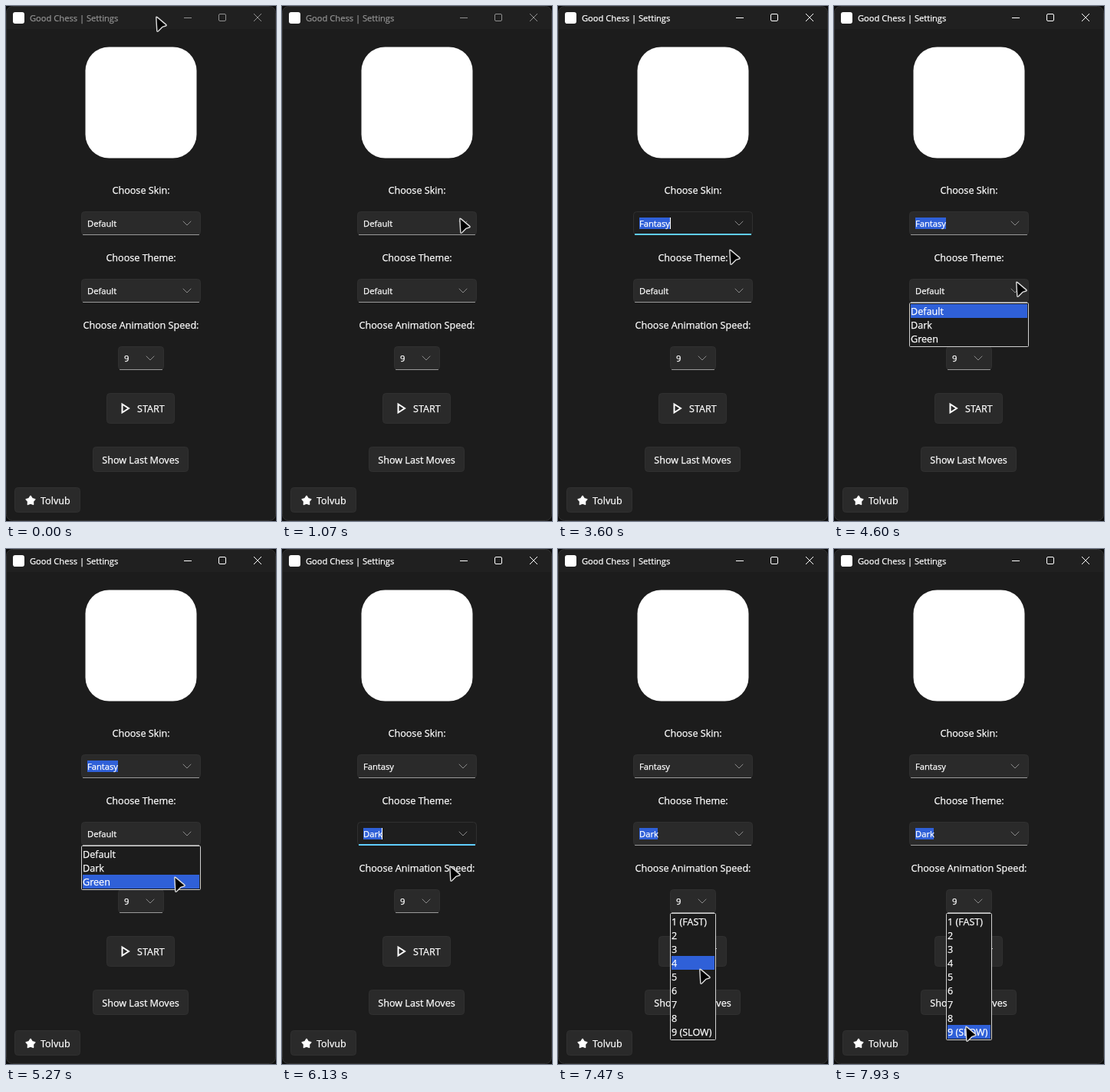
An HTML page for the animation above (8 s loop, 352 by 672 pixels).

```html
<!DOCTYPE html>
<html lang="en">
<head>
<meta charset="utf-8">
<title>Settings</title>
<style>
  html, body { margin: 0; width: 100%; height: 100%; overflow: hidden; background: #0c0c0c; }
  svg { display: block; width: 100%; height: 100%; }
  text { font: 12.6px "Open Sans", "Noto Sans", sans-serif; fill: #fff; stroke: #fff; stroke-width: .25px; white-space: pre; }
  .small { font-size: 11.2px; }
  .title { font-size: 11.15px; }
  .mid { text-anchor: middle; }
  .line { fill: none; stroke: #fff; }
  .button, .field { fill: #2a2a2a; stroke: #303030; }
  .rule { fill: #9a9a9a; }
  .chevron { fill: none; stroke: #8c8c8c; stroke-linecap: round; stroke-linejoin: round; }
  .mark { fill: #2f60d8; }
  .list { fill: #1c1c1c; stroke: #d0d0d0; }
  .focus .field { fill: #1e1e1e; }
  .focus .rule { fill: #60cdff; }
</style>
</head>
<body>
<svg viewBox="0 0 352 672">
  <rect x=".5" y=".5" width="351" height="671" rx="8" fill="#1c1c1c"/>
  <path d="M1 30V8.500Q1 1 8.500 1H343.500Q351 1 351 8.500V30Z" fill="#202020"/>
  <rect x=".5" y=".5" width="351" height="671" rx="8" fill="none" stroke="#333"/>

  <rect x="9" y="8" width="15" height="15" rx="3" fill="#fff"/>
  <g id="bar">
    <text class="title" x="31" y="20">Good Chess | Settings</text>
    <path class="line" d="M232 15.500h10M323 10l10 10M333 10l-10 10"/>
    <rect class="line" x="277.500" y="10.500" width="9" height="9" rx="1.500"/>
  </g>
  <rect x="103.500" y="53.500" width="145" height="145" rx="31" fill="#fff"/>

  <text class="mid" x="176" y="245">Choose Skin:</text>
  <text class="mid" x="176" y="333">Choose Theme:</text>
  <text class="mid" x="176" y="421">Choose Animation Speed:</text>

  <rect class="button" x="131.500" y="505.500" width="88" height="39" rx="4"/>
  <path class="line" d="M151.500 519.500V530.500L160 525Z" stroke-width="2"/>
  <text x="171" y="530">START</text>

  <rect class="button" x="113.500" y="575.500" width="124" height="32" rx="4"/>
  <text class="mid" x="175.500" y="597">Show Last Moves</text>

  <rect class="button" x="11.500" y="628.500" width="85" height="32" rx="4"/>
  <path id="star" fill="#fff" stroke="#fff" stroke-width="1.600" stroke-linejoin="round"/>
  <text x="45" y="650">Tolvub</text>

  <g id="boxes"></g>
  <g id="popups"></g>
  <path id="pointer" d="M1.800 2.200Q1.800 .5 3.200 1.600L14.800 11.400Q15.800 12.500 14.200 13L9.800 14.400L4.600 19.800Q3 21.200 2.800 19.400Z"
        fill="#000" stroke="#dcdcdc" stroke-width="1.400" stroke-linejoin="round"/>
</svg>
<script>
const LOOP = 8000, TICK = 1000 / 15, ROW = 18;
const byId = id => document.getElementById(id);

function add(parent, tag, attrs, text) {
  const node = document.createElementNS('http://www.w3.org/2000/svg', tag);
  for (const name in attrs) node.setAttribute(name, attrs[name]);
  if (text) node.textContent = text;
  return parent.appendChild(node);
}
const show = (node, on) => node.setAttribute('visibility', on ? 'visible' : 'hidden');

function makeCombo(x, y, w, options) {
  const g = add(byId('boxes'), 'g', {});
  add(g, 'rect', { class: 'field', x: x + .5, y: y + .5, width: w - 1, height: 30, rx: 4 });
  const rule = add(g, 'rect', { class: 'rule', x: x + 2, width: w - 4, rx: .5 });
  add(g, 'path', { class: 'chevron', d: `M${x + w - 23} ${y + 13}l5 5l5-5` });
  const mark = add(g, 'rect', { class: 'mark', x: x + 8, y: y + 8, height: 15 });
  const label = add(g, 'text', { class: 'small', x: x + 8, y: y + 20 });
  const caret = add(g, 'rect', { y: y + 8, width: 1, height: 15, fill: '#fff' });

  const top = y + 33;
  const popup = add(byId('popups'), 'g', {});
  add(popup, 'rect', { class: 'list', x: x + .5, y: y + 31.500, width: w - 1, height: options.length * ROW + 3, rx: 1 });
  const row = add(popup, 'rect', { class: 'mark', x: x + 2, width: w - 4, height: ROW });
  options.forEach((name, i) => add(popup, 'text', { x: x + 2, y: top + 14 + i * ROW }, name));

  return ({ value, selected, focus, blink, open }, tipY) => {
    if (label.textContent !== value) label.textContent = value;
    const width = Math.floor(label.getComputedTextLength());
    g.setAttribute('class', focus ? 'focus' : '');
    rule.setAttribute('y', y + (focus ? 29 : 30));
    rule.setAttribute('height', focus ? 2 : 1);
    mark.setAttribute('width', width);
    caret.setAttribute('x', x + 8 + width);
    show(mark, selected);
    show(caret, focus && blink);
    show(popup, open);
    const index = Math.floor((tipY - top) / ROW);
    row.setAttribute('y', top + Math.max(0, Math.min(options.length - 1, index)) * ROW);
  };
}

const skin = makeCombo(98, 268, 156, ['Default', 'Fantasy', 'Minimalist']);
const theme = makeCombo(98, 356, 156, ['Default', 'Dark', 'Green']);
const speed = makeCombo(146, 444, 60, ['1 (FAST)', ...'2345678', '9 (SLOW)']);

const corners = Array.from({ length: 10 }, (_, i) => {
  const a = -Math.PI / 2 + i * Math.PI / 5, r = i % 2 ? 3.5 : 6;
  return `${(32 + r * Math.cos(a)).toFixed(2)} ${(645.5 + r * Math.sin(a)).toFixed(2)}`;
});
byId('star').setAttribute('d', `M${corners.join('L')}Z`);

// Pointer stops: tick, x, y
const path = [
  [0, 194, 13], [3, 194, 13], [16, 230, 276], [27, 230, 276],
  [34, 217, 333], [36, 217, 342], [38, 217, 342], [45, 219, 322], [51, 219, 322],
  [54, 222, 317], [64, 236, 364], [68, 236, 364], [69, 236, 359],
  [80, 218, 429], [81, 218, 429], [85, 217, 413], [93, 217, 413],
  [101, 202, 444], [103, 202, 444], [112, 183, 547], [116, 174, 599], [119, 170, 622], [121, 170, 622]
];

// Slope through a stop; zero wherever the value rests or turns.
function slope(i, axis) {
  const a = path[i - 1], b = path[i], c = path[i + 1];
  if (!a || !c || (b[axis] - a[axis]) * (c[axis] - b[axis]) <= 0) return 0;
  return (c[axis] - a[axis]) / (c[0] - a[0]);
}

function pointerAt(k, axis) {
  const i = Math.max(0, path.findIndex(p => p[0] > k) - 1);
  const a = path[i], b = path[i + 1], span = b[0] - a[0], u = (k - a[0]) / span, v = 1 - u;
  return a[axis] * v * v * (1 + 2 * u) + b[axis] * u * u * (3 - 2 * u)
    + span * u * v * (v * slope(i, axis) - u * slope(i + 1, axis));
}

function draw(now) {
  const k = Math.floor((now % LOOP + 4) / TICK);
  const within = (from, to) => k >= from && k < to;
  const x = pointerAt(k, 1), y = pointerAt(k, 2), tip = y + 1;

  byId('bar').setAttribute('opacity', k < 18 ? .5 : 1);
  skin({ value: k < 48 ? 'Default' : 'Fantasy', selected: within(48, 92),
         focus: within(48, 64), blink: !within(57, 61), open: within(18, 48) }, tip);
  theme({ value: k < 92 ? 'Default' : 'Dark', selected: k === 64 || k >= 92,
          focus: k === 64 || within(92, 100), blink: true, open: within(65, 92) }, tip);
  speed({ value: '9', selected: k === 100, focus: k === 100, blink: true, open: k >= 101 }, tip);
  byId('pointer').setAttribute('transform', `translate(${Math.round(x)} ${Math.round(y)})`);
}

const start = performance.now();
function loop() {
  draw(performance.now() - start);
  requestAnimationFrame(loop);
}
loop();
</script>
</body>
</html>
```
